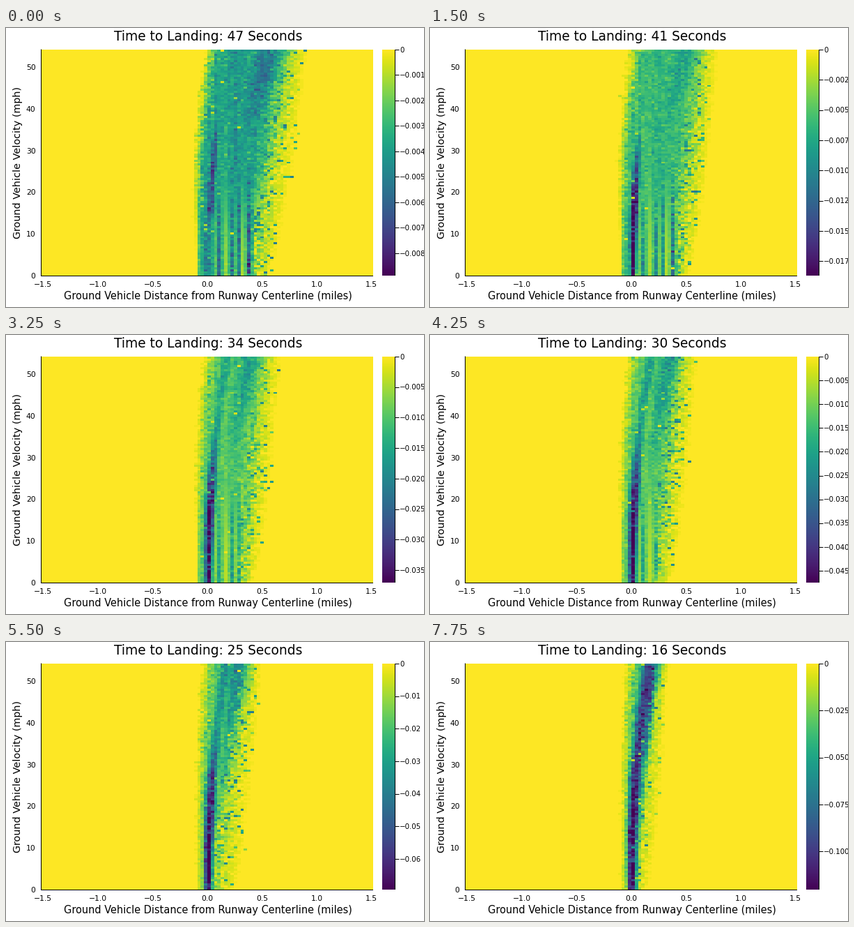
A matplotlib script for the animation above (8000 ms loop, 600 by 400 pixels).

```python
import math
import numpy as np
import matplotlib.pyplot as plt
from matplotlib.animation import FuncAnimation

W, H, DPI = 600, 400, 100
LEFT, RIGHT, TOP, BOTTOM = 51, 527, 31, 355
BAR_L, BAR_R = 540, 558
START, FRAMES, INTERVAL = 47, 32, 250
NX, NY, V_MAX = 100, 109, 54.3

plt.rcParams["font.family"] = "DejaVu Sans"

X, U = np.meshgrid(np.linspace(-1.5, 1.5, NX),
                   (np.arange(NY) + 0.5) * V_MAX / NY)
Q = U / V_MAX

# Strength of the vertical stripes at low speed, one per column
STRIPE_START = 47
STRIPES = [.26, .36, .46, .46, .36, .24, .56, .30, .14, .28, .56,
           .24, .54, .12, .22, .70, .36]
STREAKS = np.random.default_rng(5).normal(0, 0.07, NX)

SECONDS = [16, 21, 25, 30, 37, 41, 47]


def track(*values):
    """Curve through one value for each of the key seconds."""
    return lambda t: float(np.interp(t, SECONDS, values))


peak = track(.1204, .0897, .0694, .0475, .0292, .0187, .00888)
solid_low = track(.03, .05, .06, .24, .39, .43, .44)
solid_high = track(.27, .34, .38, .44, .55, .63, .73)
reach_low = track(.14, .20, .25, .34, .45, .50, .53)
reach_high = track(.36, .43, .52, .63, .75, .82, .94)
base_level = track(.28, .25, .27, .26, .27, .32, .42)
ridge_high = track(.82, .60, .50, .44, .40, .33, .38)
bulge_level = track(.80, .62, .52, .46, .41, .43, .60)
speck_rate = track(.08, .20, .20, .20, .22, .20, .22)
stripe_level = track(0, .15, .35, .72, .78, .92, 1.1)


def sigmoid(z):
    return 1 / (1 + np.exp(-np.clip(z, -40, 40)))


def bell(z):
    return np.exp(-0.5 * z * z)


def mix(a, b, k):
    return a + (b - a) * k


def heat(t):
    """Cost of each cell, from 0 (none) to 1 (worst at this time)."""
    rng = np.random.default_rng(1000 + t)
    noise = rng.normal(size=X.shape)
    chance = rng.random(X.shape)
    shade = rng.random(X.shape)
    early = (t - 16) / 31

    # Solid body between a soft left edge and a ragged right edge
    left = mix(-.055, -.09, early) + mix(.06, .14, early) * Q ** 3
    rise = np.clip((X - left) / (.07 + .05 * Q) + .5 + .12 * noise, 0, 1)
    solid = mix(solid_low(t), solid_high(t), Q ** 1.5)
    fall = sigmoid((solid - X + .02 * noise) / mix(.016, .045, Q * early))
    v = base_level(t) * (1 + STREAKS) * rise * fall

    # Stripes at low speed
    stripes = np.zeros(NX)
    stripes[STRIPE_START:STRIPE_START + len(STRIPES)] = STRIPES
    low = sigmoid((15 - U) / 4 + .5 * noise) * min(1, early * 2.2)
    v = mix(v, stripes * stripe_level(t) * fall, low)

    # Broad bulge that leans out with speed
    lean = mix(.7, .78, early) * U * t / 3600 + .015
    spread = mix(.05, .17, early) * (.5 + .5 * Q)
    bulge = bulge_level(t) * np.clip(Q * 1.5 - .3, 0, 1) ** .6
    v = np.maximum(v, bulge * bell((X - lean) / spread) * np.sqrt(fall) * rise)

    # Narrow ridge beside the centerline
    k = np.clip((U - 14) / 26, 0, 1)
    level = mix(1.04, ridge_high(t), k * k * (3 - 2 * k))
    first = np.clip((t - 41) / 6, 0, 1)
    level = level * (1 - .25 * first - .25 * first * sigmoid((14 - U) / 1.5))
    level = level + .28 * first * bell((U - 30) / 8)
    ridge = mix(.004, .015, early) + .17 * Q ** 2.2
    width = mix(.028, .019, early) + mix(.034, .026, early) * Q
    v = np.maximum(v, level * bell((X - ridge) / width) * np.sqrt(rise))

    v = v * (1 + .13 * noise)

    # Sparse specks and pale wash past the right edge
    reach = mix(reach_low(t), reach_high(t), np.sqrt(Q))
    gap = np.clip((X - solid) / np.maximum(reach - solid, .03), -1, 2)
    tail = np.clip(1 - gap, 0, 1) * (X > solid - .04)
    v = np.maximum(v, .32 * tail ** 1.5 * shade)
    speck = chance < speck_rate(t) * tail * (.4 + .9 * np.sin(np.pi * Q ** .8))
    v = np.where(speck, .15 + .45 * shade, v)

    # Pale holes in the body
    hole = (chance > .982) & (X < .3) & (U > 6)
    v = np.where(hole, np.minimum(v, .02 + .25 * shade), v)
    v[v < .012] = 0
    return np.clip(v, 0, 1)


def bar_ticks(limit):
    """Tick values and number of decimals for a scale from 0 to limit."""
    power = math.floor(math.log10(limit))
    lead = limit / 10 ** power
    part, extra = (.25, 2) if lead < 2 else (.5, 1) if lead < 5 else (1, 0)
    step = part * 10 ** power
    return [i * step for i in range(int(limit / step) + 1)], extra - power


fig = plt.figure(figsize=(W / DPI, H / DPI), dpi=DPI, facecolor="white")
ax = fig.add_axes([0, 0, 1, 1])
ax.axis("off")


def label(x, y, text, px, ha="center", **kw):
    return ax.text(x, y, text, fontsize=px * 72 / DPI, ha=ha,
                   va="baseline", color="black", **kw)


def line(xs, ys):
    ax.plot(xs, ys, color="black", lw=0.72, solid_capstyle="butt", snap=False)


image = ax.imshow(np.zeros((NY, NX)), cmap="viridis_r", vmin=0, vmax=1,
                  extent=(LEFT, RIGHT, BOTTOM, TOP), origin="upper",
                  interpolation="nearest", aspect="auto")
ax.imshow(np.linspace(0, 1, 256)[:, None], cmap="viridis_r",
          extent=(BAR_L, BAR_R, BOTTOM, TOP), interpolation="nearest",
          aspect="auto")
ax.set_xlim(0, W)
ax.set_ylim(H, 0)

line([50.5, 50.5], [TOP - .5, BOTTOM + 1])
line([50, RIGHT], [BOTTOM + .5] * 2)
line([BAR_R + .5] * 2, [TOP, BOTTOM])

for i in range(-3, 4):
    x = (LEFT + RIGHT) / 2 + i * .5 * (RIGHT - LEFT) / 3.03
    label(x, 370.6, f"{i / 2:.1f}".replace("-", "\u2212"), 10.8)
for mph in range(0, 51, 10):
    y = BOTTOM - mph * (BOTTOM - TOP) / V_MAX
    label(42.5, y + 3.6, str(mph), 10.8, ha="right")

label(289.5, 389, "Ground Vehicle Distance from Runway Centerline (miles)", 14.5)
label(21.5, 193, "Ground Vehicle Velocity (mph)", 14.4, rotation=90,
      rotation_mode="anchor")
title = label(290, 18, "", 18.6)
bar_marks = ax.vlines([], 0, 0, colors="black", lw=0.72)
bar_labels = [label(565.2, 0, "", 10.3, ha="left") for _ in range(12)]


def draw(i):
    t = START - i
    title.set_text(f"Time to Landing: {t} Seconds")
    image.set_data(heat(t)[::-1])

    limit = peak(t)
    ticks, digits = bar_ticks(limit)
    marks = []
    for text in bar_labels:
        text.set_text("")
    for text, value in zip(bar_labels, ticks):
        y = TOP + value / limit * (BOTTOM - TOP)
        marks.append([(BAR_R, y), (BAR_R + 5.5, y)])
        text.set_text(f"\u2212{value:.{digits}f}" if value else "0")
        text.set_y(y + 3.7)
    bar_marks.set_segments(marks)
    return [image, title, bar_marks, *bar_labels]


anim = FuncAnimation(fig, draw, frames=FRAMES, interval=INTERVAL,
                     repeat=True, blit=False)
plt.show()
```
